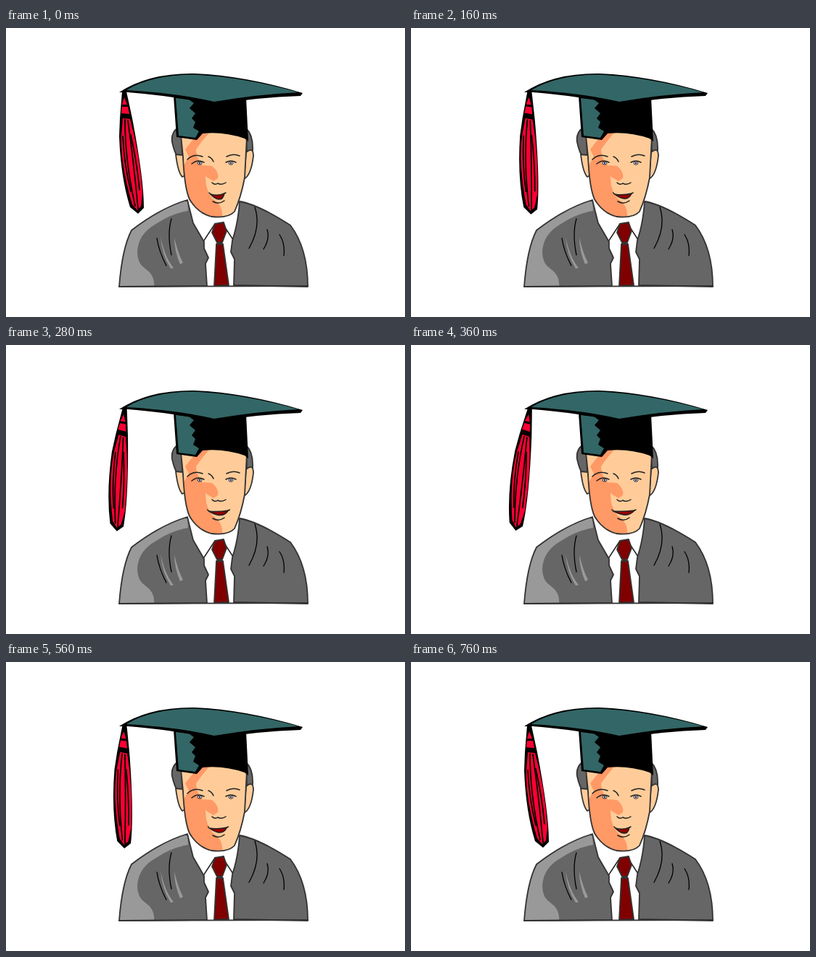
An HTML page for the animation above (0.8 s loop, 550x400 px).

```html
<!DOCTYPE html>
<html lang="en">
<head>
<meta charset="utf-8">
<title>Graduate</title>
<style>
  html, body { margin: 0; width: 100%; height: 100%; overflow: hidden; background: #fff; }
  svg { display: block; width: 550px; height: 400px; }
  .ink { stroke: #333; stroke-width: 1.8; stroke-linejoin: round; stroke-linecap: round; }
  .line { fill: none; stroke: #222; stroke-width: 1.5; stroke-linecap: round; stroke-linejoin: round; }
  .fold { fill: none; stroke: #000; stroke-width: 1.3; stroke-linecap: round; }
  .gown { fill: #666; }
  .light { fill: #999; }
  .skin { fill: #fc9; }
  .shade { fill: #ff9966; }
  .teal { fill: #366; }
  .tie { fill: #800000; }
  .red { fill: #ff0033; }
</style>
</head>
<body>
<svg viewBox="0 0 550 400">
  <!-- shirt and tie -->
  <path fill="#fff" d="M249 239L258 270L278 357H315L312 300L322 240Z"/>
  <path class="line" d="M271 297L288 271M298 270L313 293"/>
  <path class="ink tie" d="M288 271L300 269L304 281L298 297H291L284 283Z"/>
  <path class="ink tie" d="M290 299H299L307 356L287 357Z"/>

  <!-- gown -->
  <path class="gown" d="M250 238Q213 249 173 280Q160 305 156 358L277 357L275 326L279 318L273 305V296L258 270Z"/>
  <path class="light" d="M250 238Q213 249 173 280Q160 305 156 358H204Q206 343 192 333Q181 326 181 310Q182 285 207 271Q228 257 251 253Z"/>
  <path class="light" d="M213 289Q219 318 231 332L227 333Q215 314 213 289ZM232 290Q237 312 244 325L240 327Q232 308 232 290Z"/>
  <path class="ink" fill="none" d="M250 238Q213 249 173 280Q160 305 156 358L277 357L275 326L279 318L273 305V296L258 270Z"/>
  <path class="ink gown" d="M322 240Q347 244 392 273Q416 305 416 358L314 356L315 320L310 310L312 294Q320 270 322 240Z"/>
  <path class="fold" d="M208 291Q211 310 221 329M228 264Q222 285 228 314M343 248Q352 275 335 305M360 279Q364 292 355 306M377 286Q385 298 383 315"/>
  <path class="ink" fill="none" d="M156 358L416 357"/>

  <!-- head -->
  <path class="ink gown" d="M237 138Q227 145 229 158Q232 172 237 179L243 176L242 150ZM331 139Q341 148 340 170L332 173Z"/>
  <path class="ink skin" d="M234 175Q237 200 243 206L247 204L244 176ZM331 172Q341 164 341 177Q338 204 328 209Z"/>
  <path class="skin" id="face" d="M241 148L244 178Q246 222 253 237Q264 256 283 261Q306 264 315 254Q324 234 329 207L332 150L285 142Z"/>
  <path class="shade" d="M280 145L270 157L262 168Q262 180 271 190Q277 196 275 207L276 218Q281 236 290 240Q299 248 298 261L283 261Q264 256 253 237Q247 222 245 190L252 178L247 168L258 154L266 146Z"/>
  <path class="shade" d="M284 191Q294 199 292 208L286 212L276 206L272 190Z"/>
  <path class="ink" fill="none" d="M241 148L244 178Q246 222 253 237Q264 256 283 261Q306 264 315 254Q324 234 329 207L332 150"/>
  <path class="line" d="M250 182Q259 173 271 178M304 178Q313 173 322 177M279 178Q284 180 286 185M256 188Q264 181 273 186M303 186Q310 182 317 186M284 214Q288 218 292 215Q297 218 303 214M285 240Q293 245 301 239"/>
  <g fill="#fff" stroke="#222"><ellipse cx="267" cy="187" rx="3" ry="2"/><ellipse cx="310" cy="187" rx="3" ry="2.2"/></g>
  <g fill="#336"><circle cx="267" cy="187" r="1.2"/><circle cx="310" cy="187" r="1.3"/></g>
  <path id="lips" class="line" style="fill:#900"/>
  <path id="smile" class="line"/>

  <!-- cap -->
  <path d="M231 94L235 151L263 155L271 146Q300 143 329 153L334 157L331 96Z"/>
  <path class="teal" d="M234 97L252 99L259 104L253 111L261 118L256 125L261 130L258 138L266 143L261 152L238 149Z"/>
  <path d="M156 89Q197 62 260 63Q330 66 409 90L406 94Q345 96 287 106Q230 94 168 89Z"/>
  <path class="teal" d="M166 86Q200 65 260 64.5Q328 68 403 89Q345 92 287 102Q235 90 166 86Z"/>

  <!-- tassel -->
  <g id="tassel">
    <path d="M160 88L157 125L156 150Q158 206 171 248L182 257L190 249Q190 209 174 125L168 97L166 88Z"/>
    <path class="red" d="M163 96L167 106H160ZM160 109H168L170 119L159 118Z"/>
    <path class="red" d="M161 125L171 126Q184 172 188 228L186 247L181 252L174 244Q158 190 159 150Z"/>
    <path class="fold" style="stroke-width:1.8" d="M164 127Q164 184 178 246M168 128Q176 185 182 250M161 150Q163 190 172 226M172 148Q181 189 184 224"/>
  </g>
</svg>
<script>
  const STEP = 40, COUNT = 20, TURN = 9, SWING = 13;
  const el = id => document.getElementById(id);
  const tassel = el("tassel"), lips = el("lips"), smile = el("smile");
  const mix = (a, b, p) => a + (b - a) * p;

  function draw(p) {
    tassel.setAttribute("transform", `rotate(${SWING * p} 163 92)`);
    const l = mix(282, 279, p), r = mix(301, 308, p), low = mix(238, 236, p);
    lips.setAttribute("d", `M${l} 230Q292 ${mix(233, 231, p)} ${r} 229Q${mix(299, 302, p)} ${low} 293 ${low - 1}Q287 ${low - 2} ${l} 230Z`);
    smile.setAttribute("d", `M${l - 2} 228L${l} 230M${r} 229L${r + 2} 228`);
  }

  function tick() {
    const n = Math.floor(performance.now() / STEP) % COUNT;
    draw(n <= TURN ? n / TURN : (COUNT - 1 - n) / (COUNT - 1 - TURN));
    requestAnimationFrame(tick);
  }
  tick();
</script>
</body>
</html>
```
